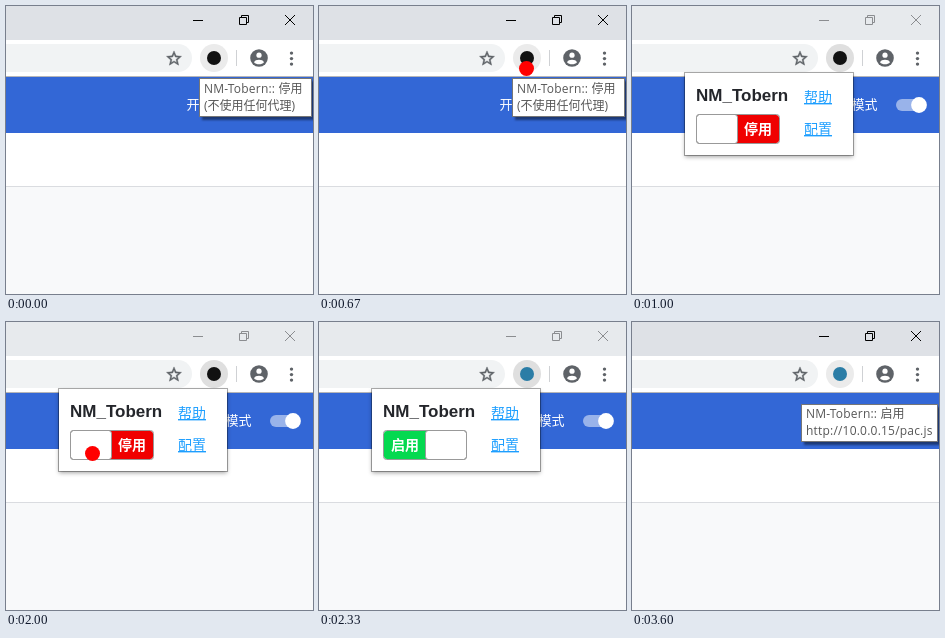
Animation, 307 px wide and 288 px high, one loop 4 s. Source, as an HTML page:

```html
<!DOCTYPE html>
<html lang="zh-CN">
<head>
<meta charset="utf-8">
<title>代理开关</title>
<style>
html, body { margin: 0; width: 100%; height: 100%; overflow: hidden; background: #fff; }
svg { display: block; width: 307px; height: 288px; }
text { font-family: "Liberation Sans", "Noto Sans CJK SC", "Noto Sans CJK", sans-serif; }

/* Every state switches hard on one shared 4 s clock. */
.timed { visibility: hidden; animation: 4s step-end infinite; }
.hover-tip { animation-name: hover-tip; }
.first-click { animation-name: first-click; }
.popup { animation-name: popup; }
.off { animation-name: off; }
.second-click { animation-name: second-click; }
.on { animation-name: on; }
.result-tip { animation-name: result-tip; }
@keyframes hover-tip { 0% { visibility: visible } 25%, 100% { visibility: hidden } }
@keyframes first-click { 0% { visibility: hidden } 16.75% { visibility: visible } 25%, 100% { visibility: hidden } }
@keyframes popup { 0% { visibility: hidden } 25% { visibility: visible } 75%, 100% { visibility: hidden } }
@keyframes off { 0% { visibility: hidden } 25% { visibility: visible } 58.25%, 100% { visibility: hidden } }
@keyframes second-click { 0% { visibility: hidden } 50% { visibility: visible } 58.25%, 100% { visibility: hidden } }
@keyframes on { 0% { visibility: hidden } 58.25% { visibility: visible } 75%, 100% { visibility: hidden } }
@keyframes result-tip { 0% { visibility: hidden } 75%, 100% { visibility: visible } }

.title-bar { fill: #dee1e6; animation: faded 4s step-end infinite; }
.controls { fill: none; stroke: #000; animation: inactive 4s step-end infinite; }
.halo { fill: #ebebeb; animation: pressed 4s step-end infinite; }
.badge { fill: #111; animation: enabled 4s step-end infinite; }
@keyframes faded { 25% { fill: #e7eaed } 75%, 100% { fill: #dee1e6 } }
@keyframes inactive { 25% { stroke: #8b8d90 } 75%, 100% { stroke: #000 } }
@keyframes pressed { 25% { fill: #dfdfdf } 75%, 100% { fill: #ebebeb } }
@keyframes enabled { 58.25%, 100% { fill: #2b7da6 } }

.tip rect { fill: #fff; stroke: #767676; filter: drop-shadow(3px 3px 1px rgba(0, 0, 0, .45)); }
.tip text { font: 12px "Open Sans", "Noto Sans CJK SC", "Noto Sans CJK", sans-serif; fill: #575757; }
.latin { letter-spacing: .2px; }
.panel { fill: #fff; filter: drop-shadow(0 2px 2px rgba(0, 0, 0, .35)); }
.edge { fill: none; stroke: rgba(0, 0, 0, .32); }
.name { font-size: 17px; font-weight: bold; fill: #24262b; }
.link { font-size: 14px; fill: #1e9fff; text-decoration: underline; }
.state { font-size: 14px; font-weight: bold; fill: #fff; }
.frame { fill: none; stroke: #999; }
.knob { fill: #fff; stroke: #999; }
.dot { fill: #f00; }
</style>
</head>
<body>
<svg viewBox="0 0 307 288">
  <!-- page -->
  <rect width="307" height="288" fill="#fff"/>
  <rect y="180" width="307" height="108" fill="#f8f9fa"/>
  <rect y="180" width="307" height="1" fill="#dadce0"/>
  <rect y="71" width="307" height="56" fill="#3367d6"/>
  <text x="180.5" y="103" font-size="13" fill="#fff">开发者模式</text>
  <rect x="264" y="93" width="28" height="12" rx="6" fill="#99b3ea"/>
  <circle cx="287" cy="99" r="7.9" fill="#fff"/>

  <!-- browser bar -->
  <rect class="title-bar" width="307" height="34"/>
  <rect y="70" width="307" height="1" fill="#b6b6b8"/>
  <rect x="-30" y="38" width="216" height="28" rx="14" fill="#f1f3f4"/>
  <g class="controls">
    <path d="M187 14.5h10M233.5 11.5h7v7h-7zM235.5 11.5v-2h7v7h-2"/>
    <path d="M279 9l10 10M289 9l-10 10"/>
  </g>
  <g fill="#5f6368">
    <path transform="translate(159 43.4) scale(.75)" stroke="#5f6368" stroke-width=".6" d="M22 9.24l-7.19-.62L12 2 9.19 8.63 2 9.24l5.46 4.73L5.82 21 12 17.27 18.18 21l-1.63-7.03zM12 15.4l-3.76 2.27 1-4.28-3.32-2.88 4.38-.38L12 6.1l1.71 4.04 4.38.38-3.32 2.88 1 4.28z"/>
    <circle cx="253" cy="52" r="8.8"/>
    <circle cx="285.5" cy="47.1" r="1.7"/>
    <circle cx="285.5" cy="52.6" r="1.7"/>
    <circle cx="285.5" cy="58.1" r="1.7"/>
  </g>
  <circle cx="253" cy="49.2" r="2.6" fill="#fff"/>
  <path d="M248 56.2c1-3.3 9-3.3 10 0c-2.2 2.7-7.8 2.7-10 0z" fill="#fff"/>
  <rect x="230" y="44" width="1" height="16" fill="#cfd1d4"/>
  <circle class="halo" cx="208" cy="52" r="14"/>
  <circle class="badge" cx="208" cy="52" r="7"/>

  <!-- tooltips -->
  <g class="timed tip hover-tip">
    <rect x="193.5" y="72.5" width="112" height="38"/>
    <text x="198" y="87"><tspan class="latin">NM-Tobern:: </tspan>停用</text>
    <text x="198" y="104">(不使用任何代理)</text>
  </g>
  <g class="timed tip result-tip">
    <rect x="169.5" y="82.5" width="136" height="37"/>
    <text x="174" y="96"><tspan class="latin">NM-Tobern:: </tspan>启用</text>
    <text x="174" y="113" class="latin">http://10.0.0.15/pac.js</text>
  </g>

  <!-- popup -->
  <g class="timed popup">
    <rect class="panel" x="53" y="67" width="168" height="82"/>
    <rect class="edge" x="52.5" y="66.5" width="169" height="83"/>
    <text class="name" x="64" y="95">NM_Tobern</text>
    <text class="link" x="172" y="96">帮助</text>
    <text class="link" x="172" y="128">配置</text>
  </g>
  <g class="timed off">
    <rect x="65" y="109" width="82" height="28" rx="3" fill="#f00000"/>
    <text class="state" x="112" y="128">停用</text>
    <rect class="knob" x="64.5" y="108.5" width="41" height="29" rx="3"/>
  </g>
  <g class="timed on">
    <rect x="65" y="109" width="82" height="28" rx="3" fill="#04d950"/>
    <text class="state" x="72" y="128">启用</text>
    <rect class="knob" x="106.5" y="108.5" width="41" height="29" rx="3"/>
  </g>
  <rect class="timed popup frame" x="64.5" y="108.5" width="83" height="29" rx="3"/>

  <!-- clicks -->
  <circle class="timed first-click dot" cx="207.5" cy="62.5" r="7.5"/>
  <circle class="timed second-click dot" cx="86.5" cy="131.5" r="7.5"/>
</svg>
</body>
</html>
```
